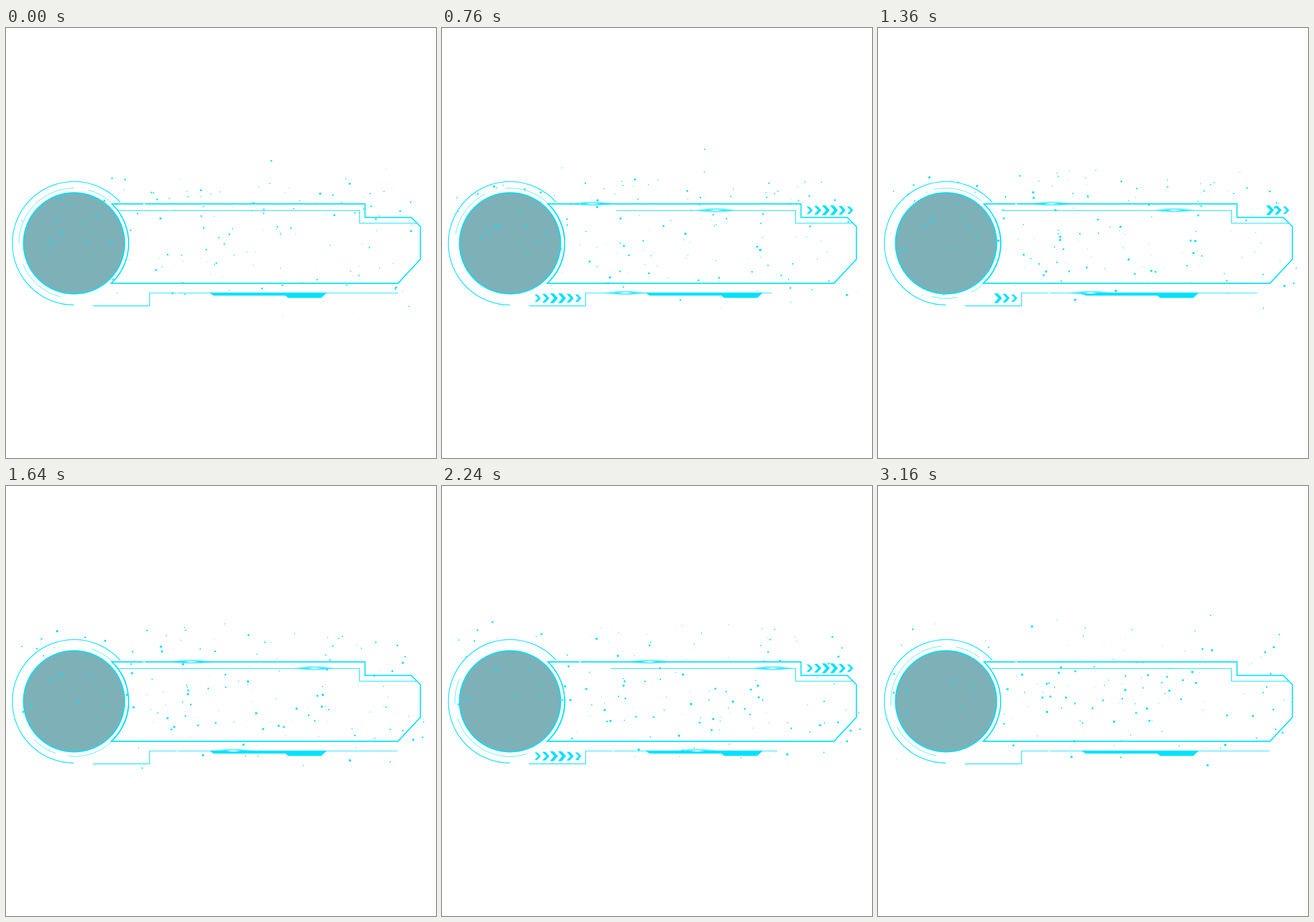
Write an HTML page with a canvas that moves like this. It is 748x748 px and loops after 3.2 s.

```html
<!DOCTYPE html>
<html lang="en">
<head>
<meta charset="utf-8">
<title>HUD panel</title>
<style>
  html, body { margin: 0; width: 100%; height: 100%; overflow: hidden; background: #fff; }
  canvas { display: block; }
</style>
</head>
<body>
<canvas id="stage" width="748" height="748"></canvas>
<script>
const ctx = document.getElementById('stage').getContext('2d');
const LOOP = 3200, STEP = 40;
const CYAN = '#00e1ff', TEAL = '#7eb0b7';
const CX = 118.4, CY = 374.5;
const TAU = Math.PI * 2;

const clamp = v => Math.max(0, Math.min(1, v));
const rad = deg => deg * Math.PI / 180;

// Dots are born in the lower band and drift upwards; times are in seconds
function scatter(count) {
  let seed = 4127;
  const rnd = () => (seed = (seed * 16807) % 2147483647) / 2147483647;
  const between = (a, b) => a + (b - a) * rnd();
  const dots = [];
  while (dots.length < count) {
    const dot = {
      x: between(22, 735), y: between(300, 505),
      vx: between(-8, 6), vy: between(-28, -16),
      birth: between(-3, 3.1), life: between(2.4, 3.6),
      r: .5 + 1.6 * rnd() ** 1.4
    };
    // keep only some of the dots beside the disc and the panel
    const aside = dot.x > 700 || dot.x < 190 && Math.hypot(dot.x - CX, dot.y - CY) > 88;
    if (!aside || rnd() < .35) dots.push(dot);
  }
  return dots;
}
const dots = scatter(345);

function trace(points) {
  ctx.beginPath();
  points.forEach(([x, y]) => ctx.lineTo(x, y));
}

function line(points, width) {
  trace(points);
  ctx.lineWidth = width;
  ctx.stroke();
}

function shape(points) {
  trace(points);
  ctx.fill();
}

function arc(r, from, to, width) {
  ctx.beginPath();
  ctx.arc(CX, CY, r, rad(from), rad(to));
  ctx.lineWidth = width;
  ctx.stroke();
}

function drawDisc(t) {
  ctx.fillStyle = TEAL;
  ctx.beginPath();
  ctx.arc(CX, CY, 88, 0, TAU);
  ctx.fill();
  arc(88, 0, 360, 2);
  arc(107.4, 90, 318.5, 1.3);

  const spin = 360 * t / LOOP;
  ctx.globalAlpha = .85;
  [[180, 270], [285, 312], [104, 157]].forEach(([a, b]) => arc(96, a + spin, b + spin, .8));
  ctx.globalAlpha = 1;
}

function drawPanel(t) {
  ctx.beginPath();
  ctx.arc(CX, CY, 95, rad(47), rad(-46.1), true);
  ctx.lineTo(624.5, 306);
  ctx.lineTo(624.5, 329.5);
  ctx.lineTo(705, 329.5);
  ctx.lineTo(720.8, 345.3);
  ctx.lineTo(720.8, 402.3);
  ctx.lineTo(682, 444);
  ctx.closePath();
  ctx.lineWidth = 1.9;
  ctx.stroke();

  const cut = 54.5 * (1 - Math.cos(TAU * t / 1600));
  line([[195 + cut, 317.5], [615, 317.5], [615, 339.5], [716, 339.5]], 1.2);
  line([[151, 483.3], [249.8, 483.3], [249.8, 461], [682 - cut, 461]], 1.2);

  ctx.fillStyle = CYAN;
  shape([[354, 460.5], [558, 460.5], [548.5, 469.6], [491, 469.6], [486, 465.6], [361, 465.6]]);

  ctx.fillStyle = 'rgba(255,255,255,.6)';
  ctx.fillRect(238.5, 304.5, 3.5, 3);
  ctx.fillRect(296.5, 459.5, 3, 3);
}

function drawChevrons(t) {
  const phase = t % 1600;
  ctx.fillStyle = CYAN;
  for (let i = 0; i < 6; i++) {
    if (phase < 80 + 80 * i || phase >= 1160 + 80 * i) continue;
    const rank = Math.min(i, 5 - i);
    const h = 6.5 + rank, w = 10.7 + 1.6 * rank, k = 4.6 + .9 * rank;
    for (const [cx, y] of [[639.5, 317], [166.5, 470]]) {
      const x = cx + 14.1 * i - w / 2;
      shape([[x, y - h], [x + k, y - h], [x + w, y], [x + k, y + h], [x, y + h], [x + w - k, y]]);
    }
  }
}

function glow(rx, ry, rgb) {
  const g = ctx.createRadialGradient(0, 0, 0, 0, 0, 1);
  g.addColorStop(0, `rgba(${rgb},1)`);
  g.addColorStop(.4, `rgba(${rgb},.7)`);
  g.addColorStop(1, `rgba(${rgb},0)`);
  ctx.save();
  ctx.scale(rx, ry);
  ctx.fillStyle = g;
  ctx.beginPath();
  ctx.arc(0, 0, 1, 0, TAU);
  ctx.fill();
  ctx.restore();
}

function drawFlares(t) {
  const p = .5 - .5 * Math.cos(Math.PI * clamp(t / 2920));
  const alpha = clamp(t / 500) * clamp((2960 - t) / 520);
  for (const [x, dist, y] of [[240, 138, 305.6], [454.5, 138, 317], [291, 175.5, 460.8]]) {
    ctx.save();
    ctx.globalAlpha = alpha;
    ctx.translate(x + dist * p, y);
    glow(38, 4.5, '0,225,255');
    glow(14, 2.1, '255,255,255');
    ctx.restore();
  }
}

function drawDots(t) {
  ctx.fillStyle = CYAN;
  for (const d of dots) {
    const age = t / 1000 - d.birth;
    const size = clamp(age / .2) * clamp((d.life - age) / .3);
    if (!size) continue;
    ctx.beginPath();
    ctx.arc(d.x + d.vx * age, d.y + d.vy * age, d.r * size, 0, TAU);
    ctx.fill();
  }
}

function frame() {
  const t = Math.floor(performance.now() % LOOP / STEP) * STEP;
  ctx.fillStyle = '#fff';
  ctx.fillRect(0, 0, 748, 748);
  ctx.strokeStyle = CYAN;
  drawDisc(t);
  drawPanel(t);
  drawChevrons(t);
  drawFlares(t);
  drawDots(t);
  requestAnimationFrame(frame);
}
frame();
</script>
</body>
</html>
```
